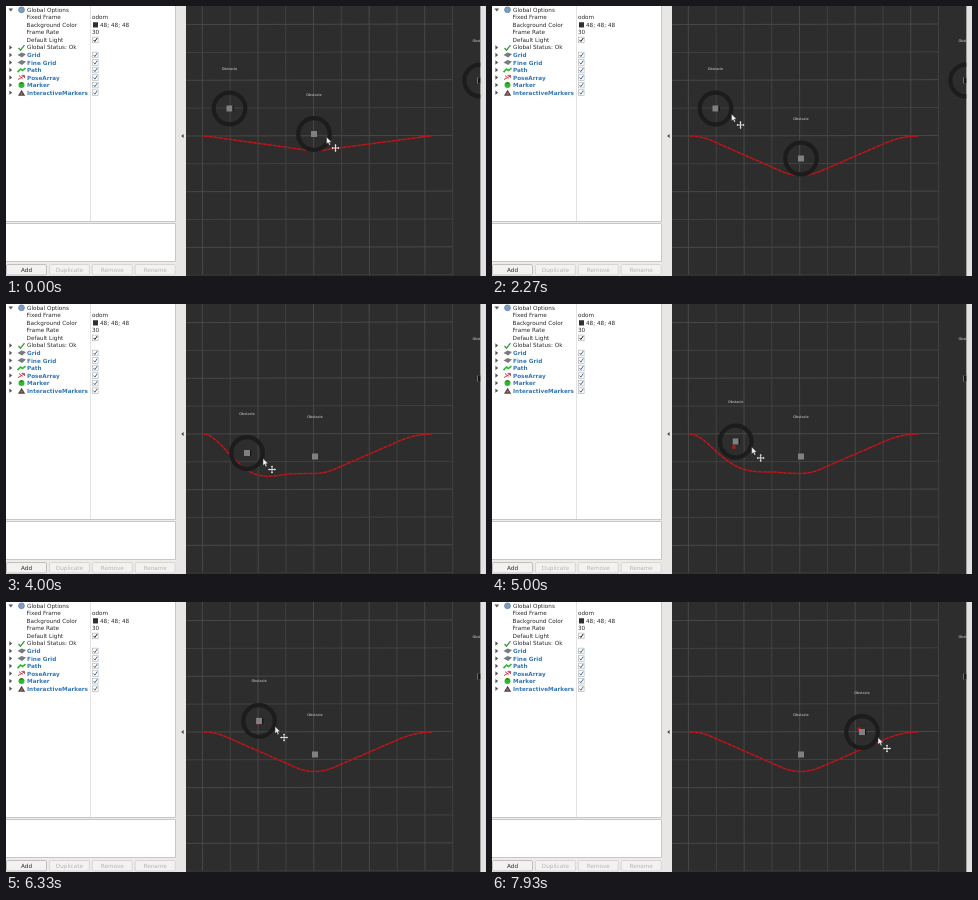
Animation of 480x270 px, one loop 8 s. Source, as an HTML page:

```html
<!DOCTYPE html>
<html lang="en">
<head>
<meta charset="utf-8">
<title>Obstacle path view</title>
<style>
html, body { margin: 0; width: 100%; height: 100%; overflow: hidden; background: #edecea; }
svg { display: block; width: 100vw; height: 100vh; }
text { font: 5.7px "DejaVu Sans", sans-serif; fill: #2c2c2c; text-rendering: geometricPrecision; }
.bold { font-weight: bold; fill: #3477b5; }
.off { fill: #b9b7b5; }
.tag { font-size: 3.5px; fill: #d4d4d4; text-anchor: middle; }
.mid { text-anchor: middle; }
</style>
</head>
<body>
<svg id="stage" viewBox="0 0 480 270" preserveAspectRatio="none">
  <defs><clipPath id="view"><rect x="180" width="294.6" height="270"/></clipPath></defs>
  <g id="panel"></g>
  <g id="scene" clip-path="url(#view)"></g>
  <g id="frame"></g>
</svg>
<script>
const LOOP = 8000, STEP = 1000 / 15, LAG = 130;
const $ = id => document.getElementById(id);
const panel = $('panel'), scene = $('scene'), frame = $('frame');

function add(parent, tag, attrs = {}, text = '') {
  const el = document.createElementNS('http://www.w3.org/2000/svg', tag);
  for (const key in attrs) el.setAttribute(key, attrs[key]);
  el.textContent = text;
  parent.append(el);
  return el;
}
const rect = (parent, x, y, width, height, fill, more) =>
  add(parent, 'rect', { x, y, width, height, fill, ...more });
const shape = (parent, d, fill, more) => add(parent, 'path', { d, fill, ...more });
const label = (x, y, text, cls = '') => add(panel, 'text', { x, y: y + 2, class: cls }, text);
const line = (parent, d, stroke, width = 1) =>
  shape(parent, d, 'none', { stroke, 'stroke-width': width });

// Property panel
rect(panel, 0, 0, 169, 215, '#fff');
rect(panel, 0, 218, 169, 37, '#fff');
line(panel, 'M0 215.5H169.5V0M0 217.5H169.5V255.5H0', '#c9c7c5');
line(panel, 'M84.5 0V215', '#e3e3e3');

function checkbox(y, colour) {
  rect(panel, 86.5, y - 2.8, 5.6, 5.6, '#fff', { stroke: '#b8b8b8', 'stroke-width': .7 });
  line(panel, `M87.6 ${y}l1.3 1.6l2.3 -3.5`, colour, 1);
}

const icons = [
  y => add(panel, 'circle', { cx: 15.5, cy: y, r: 2.9, fill: '#7f9dc0', stroke: '#5f7fa6', 'stroke-width': .8 }),
  y => line(panel, `M12.5 ${y + .5}l2 2.2l4 -5`, '#3c9a3c', 1.3),
  y => shape(panel, `M11.5 ${y}l4 -2.6l4.5 1.6l-3.8 3.4z`, '#777b82'),
  y => shape(panel, `M11.5 ${y}l4 -2.6l4.5 1.6l-3.8 3.4z`, '#777b82'),
  y => line(panel, `M11.5 ${y + 2}l3 -3l2 1.5l3 -2.5`, '#2fba36', 1.7),
  y => line(panel, `M12 ${y + 2}l6 -3.4m-2.5 -.8h3v2.5M13 ${y - 2}l3.5 3`, '#d33a4a', 1),
  y => {
    add(panel, 'circle', { cx: 15.5, cy: y, r: 3, fill: '#2db92d' });
    shape(panel, `M13.5 ${y - 1.4}l2 -2l2 2z`, '#8a4a30');
  },
  y => {
    shape(panel, `M12 ${y + 3}l3.6 -6l3.6 6z`, '#4d4444');
    rect(panel, 14.6, y, 2, 2, '#b06a60');
  }
];

const rowY = i => 3.8 + i * 7.53;
const group = (i, icon, text, cls, open) => {
  const y = rowY(i);
  shape(panel, open ? `M2.5 ${y - 1.3}h4.6l-2.3 3z` : `M3.4 ${y - 2.2}v4.4l2.8 -2.2z`, '#555');
  icons[icon](y);
  label(21, y, text, cls);
};

group(0, 0, 'Global Options', '', true);
[['Fixed Frame', 'odom', 86], ['Background Color', '48; 48; 48', 94], ['Frame Rate', '30', 86], ['Default Light']]
  .forEach(([name, value, x], i) => {
    label(20.5, rowY(i + 1), name);
    if (value) label(x, rowY(i + 1), value);
  });
rect(panel, 87, rowY(2) - 2.6, 5, 5.2, '#303030');
checkbox(rowY(4), '#222');
group(5, 1, 'Global Status: Ok');
['Grid', 'Fine Grid', 'Path', 'PoseArray', 'Marker', 'InteractiveMarkers'].forEach((name, i) => {
  group(i + 6, i + 2, name, 'bold');
  checkbox(rowY(i + 6), '#3f6a9c');
});
['Add', 'Duplicate', 'Remove', 'Rename'].forEach((name, i) => {
  rect(panel, .5 + i * 42.9, 258.5, 40, 10.5, '#f3f2f1', { rx: 1.2, stroke: i ? '#d2d0ce' : '#b5b3b1', 'stroke-width': .8 });
  label(20.5 + i * 42.9, 263.8, name, i ? 'mid off' : 'mid');
});

// 3D view
rect(scene, 180, 0, 295, 270, '#2d2d2d');
for (let i = 0; i < 10; i++) {
  const x = 196.3 + i * 27.8, y = 18.3 + i * 27.85, colour = i % 2 ? '#434343' : '#4b4b4b';
  line(scene, `M${x} 0L${x + .3} 270`, colour, .9);
  line(scene, `M180 ${y + .3}L446.5 ${y - .3}`, colour, .9);
}
line(scene, 'M180 269.3H446', '#43252a', 1);

function makeObstacle() {
  const dot = add(scene, 'circle', { r: 1.9, fill: '#b01a1c' });
  const ring = add(scene, 'circle', { r: 15.8, fill: 'none', stroke: '#1c1c1c', 'stroke-width': 4.2 });
  scene.insertBefore(ring, dot);
  const box = add(scene, 'g');
  rect(box, -3, -3, 6, 6, '#808080');
  add(box, 'text', { class: 'tag', y: -38.5 }, 'Obstacle');
  return { dot, ring, box };
}

const pathBase = line(scene, '', '#9c1519', 1.4);
const pathDots = line(scene, '', '#bd1b1f', 1.1);
pathDots.setAttribute('stroke-dasharray', '3 2');
line(scene, 'M414 130.3L428 129.5', '#b0191d', 1.2);
const side = makeObstacle(), centre = makeObstacle(), edge = makeObstacle();
rect(side.box, 3, -2.6, 1.2, 5.6, '#141414');
rect(edge.box, -2.2, -3, 6, 6, '#161616');

const cursor = add(scene, 'g');
line(cursor, 'M9 7.6V14.4M5.6 11H12.4', '#dedede', 1);
shape(cursor, 'M9 7l1.2 1.5h-2.4zM9 15l1.2 -1.5h-2.4zM5 11l1.5 -1.2v2.4zM13 11l-1.5 -1.2v2.4z', '#dedede');
shape(cursor, 'M0 0L0 7L1.6 5.6L2.8 8.2L4 7.6L2.9 5.2L5 5z', '#f4f4f4', { stroke: '#222', 'stroke-width': .4 });

// Splitters
rect(frame, 170, 0, 10, 270, '#e9e7e5');
rect(frame, 474.6, 0, 5.4, 270, '#e4e2e0');
shape(frame, 'M177.6 128v4l-2.4 -2z', '#444');

// Motion: time, x, y
const centreKeys = [[130, 308, 128], [600, 309, 138], [730, 309, 146], [1000, 309, 151], [1200, 309, 152.5]];
const sideKeys = [
  [2530, 223.5, 102.5], [2730, 233, 112], [3000, 248, 130], [3130, 245, 138], [3400, 243, 145],
  [4000, 241, 149], [4500, 242, 148], [4870, 242, 143], [5000, 243.7, 137.5], [5200, 244, 134],
  [6000, 251, 124], [6330, 253, 119], [6870, 264, 112], [7200, 300, 92], [7500, 345, 100],
  [7730, 365, 124], [7800, 367, 127], [7930, 370, 130]
];
const mix = (a, b, k) => a + (b - a) * k;
const clamp = k => Math.min(1, Math.max(0, k));

function sample(keys, t) {
  const i = keys.findIndex(k => k[0] > t);
  if (i === 0) return keys[0].slice(1);
  if (i < 0) return keys.at(-1).slice(1);
  const a = keys[i - 1], b = keys[i], k = (t - a[0]) / (b[0] - a[0]);
  return [mix(a[1], b[1], k), mix(a[2], b[2], k)];
}

// Straight ramp with rounded ends of lengths a and b
function ramp(u, a, b) {
  const total = 1 - (a + b) / 2;
  if (u < a) return u * u / (2 * a) / total;
  if (u < 1 - b) return (u - a / 2) / total;
  return 1 - (1 - u) ** 2 / (2 * b) / total;
}

function route(low, push) {
  const sag = low[1] + 17 - 130, round = mix(.15, 1, clamp((sag - 15) / 10));
  const base = x => 130 + sag * (x < 308.5
    ? ramp(clamp((x - 198) / 110.5), .2 * round, .17 * round)
    : ramp(clamp((426 - x) / 117.5), .28 * round, .17 * round));
  const lift = push[0] < 290 ? Math.max(0, push[1] + 17 - base(push[0])) : 0;
  let d = '';
  for (let x = 198; x <= 426; x += 3) {
    const bump = x < 308 ? 1.08 * Math.sin(Math.PI * ((x - 198) / 110) ** .85) ** 2 : 0;
    d += `${d ? 'L' : 'M'}${x} ${(base(x) + lift * bump).toFixed(2)}`;
  }
  return d;
}

const place = (el, [x, y]) => el.setAttribute('transform', `translate(${x} ${y})`);
function pose(item, at, dotAt, ringOn) {
  place(item.ring, at);
  place(item.box, at);
  place(item.dot, dotAt);
  item.ring.style.display = ringOn ? '' : 'none';
}

function draw(t) {
  const low = sample(centreKeys, t), lowLag = sample(centreKeys, t - LAG);
  const left = sample(sideKeys, t), leftLag = sample(sideKeys, t - LAG);
  const idle = t < 100 || (t > 1520 && t < 2590);
  pose(centre, low, lowLag, idle || t < 2000);
  pose(side, left, leftLag, idle || t > 2000);
  pose(edge, [474.2, 74.5], [474.2, 74.5], idle);
  const d = route(lowLag, leftLag);
  pathBase.setAttribute('d', d);
  pathDots.setAttribute('d', d);
  const k = clamp((t - 1440) / 800), ease = k * k * (3 - 2 * k);
  place(cursor, [mix(low[0] + 12.5, left[0] + 16, ease), mix(low[1] + 3, left[1] + 5.5, ease)]);
}

function tick() {
  const t = performance.now() % LOOP;
  draw(Math.floor((t + 5) / STEP) * STEP);
  requestAnimationFrame(tick);
}
tick();
</script>
</body>
</html>
```
